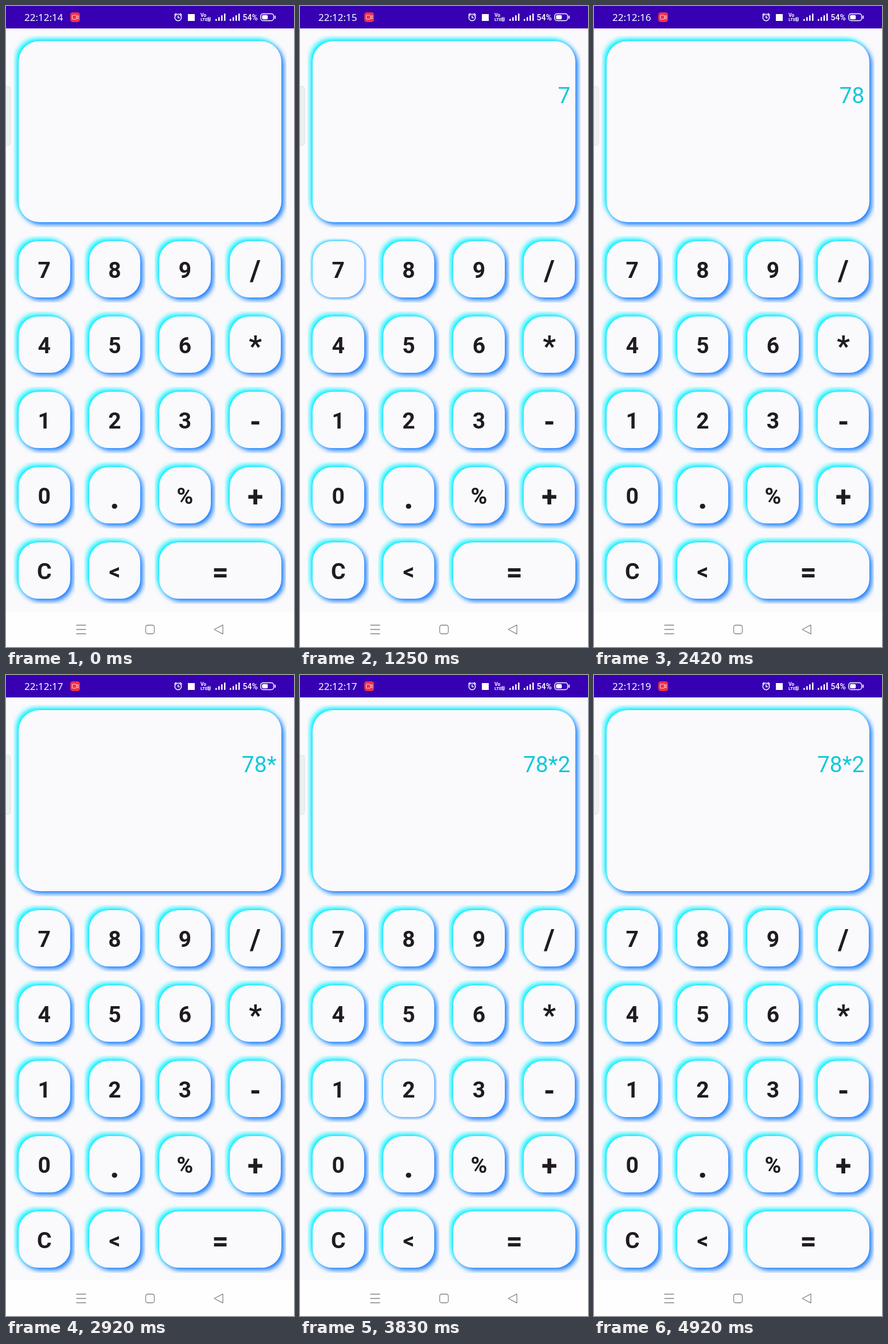
An HTML page for the animation above (5.01 s loop, 502x1115 px).

```html
<!DOCTYPE html>
<html lang="en">
<head>
<meta charset="utf-8">
<title>Calculator</title>
<style>
  html, body { margin: 0; width: 502px; height: 1115px; overflow: hidden; background: #faf9fc; }
  #stage { position: relative; width: 502px; height: 1115px; overflow: hidden; }
  svg { position: absolute; left: 0; top: 0; }
  text { font-family: Roboto, sans-serif; }
  /* The clip cuts the glow off at the bounds of each panel. */
  .clip { position: absolute; overflow: hidden; }
  .panel {
    position: absolute; inset: 8.6px; border-radius: 34px; background: #faf9fc;
    box-shadow: 4.3px 4.3px 8px #147aff, -4.3px -4.3px 8px #00f6ff;
  }
  .pressed { clip-path: inset(3.5px); }
  .pressed .panel { box-shadow: 1.8px 1.8px 5px #3c92ff, -1.8px -1.8px 5px #20d8ff; }
  .status text { fill: #fff; }
  #clock { font: 17px "Noto Sans", sans-serif; }
</style>
</head>
<body>
<div id="stage">
  <svg id="ink" width="502" height="1115" viewBox="0 0 502 1115" style="z-index:1">
    <g class="status">
      <rect width="502" height="39" fill="#3700b3"/>
      <text id="clock" x="32" y="26">22:12:14</text>
      <rect x="112" y="11" width="17" height="17" rx="4.5" fill="#ee2f48"/>
      <g fill="none" stroke="#ffd9de" stroke-width="1">
        <rect x="115.5" y="16" width="7.5" height="7" rx="1"/>
        <path d="M123 18.5l3-1.8v5.6l-3-1.8"/>
      </g>
      <g fill="none" stroke="#fff" stroke-width="1.5" stroke-linecap="round">
        <circle cx="300" cy="20" r="5.7"/>
        <path d="M300 17v3.4h2.6M293.7 15.8l2.8-2.7M306.3 15.8l-2.8-2.7"/>
      </g>
      <rect x="317" y="14" width="12" height="12" fill="#fff"/>
      <text x="339" y="18.5" font-size="8.5" font-weight="700">Vo</text>
      <text x="339" y="26" font-size="7.5" font-weight="700">LTE</text>
      <rect x="351.5" y="19.5" width="5" height="7" rx="1" fill="#fff"/>
      <text x="354" y="25.3" font-size="6.5" font-weight="700" text-anchor="middle" style="fill:#3700b3">2</text>
      <g id="bars" fill="#fff"></g>
      <text x="412.5" y="24.5" font-size="14" font-weight="500">54%</text>
      <rect x="444" y="13.5" width="22.5" height="12" rx="4" fill="none" stroke="#fff" stroke-width="1.5"/>
      <rect x="446.3" y="15.7" width="10" height="7.6" rx="2" fill="#fff"/>
      <path d="M469 17.5v4" stroke="#fff" stroke-width="1.8" stroke-linecap="round"/>
    </g>
    <rect x="-8" y="139.5" width="16" height="103" rx="5" fill="#eeeff1" stroke="#dfe1e3"/>
    <rect y="1053" width="502" height="62" fill="#fefefe"/>
    <g fill="none" stroke="#858585" stroke-width="1.3" stroke-linejoin="round">
      <path d="M122.5 1077h17M122.5 1084.5h17M122.5 1092h17"/>
      <rect x="243.5" y="1077" width="15" height="15" rx="3.5"/>
      <path d="M363 1084.5L378 1076.7V1092.3Z"/>
    </g>
    <text id="entry" x="471.5" y="169" font-size="39" fill="#12c8d8" text-anchor="end"></text>
  </svg>
</div>
<script>
const LOOP = 5010, PAD = 8.6;
const stage = document.getElementById('stage');
const ink = document.getElementById('ink');
const clock = document.getElementById('clock');
const entry = document.getElementById('entry');
const keys = {};

function panel(x, y, w, h, radius) {
  const clip = document.createElement('div');
  clip.className = 'clip';
  clip.style.cssText =
    `left:${x - PAD}px;top:${y - PAD}px;width:${w + 2 * PAD}px;height:${h + 2 * PAD}px`;
  const face = document.createElement('div');
  face.className = 'panel';
  face.style.borderRadius = radius + 'px';
  clip.append(face);
  stage.append(clip);
  return clip;
}

function svg(tag, attrs, parent) {
  const el = document.createElementNS('http://www.w3.org/2000/svg', tag);
  for (const name in attrs) el.setAttribute(name, attrs[name]);
  parent.append(el);
  return el;
}

function addKey(label, col, row) {
  const x = 22 + col * 122.6, y = 409 + row * 131;
  const w = label === '=' ? 212.5 : 89.6, h = 98;
  const size = label === '.' ? 58 : '/*-+='.includes(label) ? 50 : 39;
  keys[label] = panel(x, y, w, h, 34);
  svg('text', {
    x: x + w / 2, y: y + h / 2 + size * 0.392,
    'font-size': size, 'font-weight': 700, 'text-anchor': 'middle', fill: '#1f1b20'
  }, ink).textContent = label;
}

panel(22, 61, 458, 315.5, 36);
['789/', '456*', '123-', '0.%+', 'C<='].forEach((line, row) =>
  [...line].forEach((label, col) => addKey(label, col, row)));

for (const x of [365, 390])
  for (let i = 0; i < 4; i++) {
    const h = 3.5 + i * 3.2;
    svg('rect', { x: x + i * 5, y: 26 - h, width: 2.5, height: h, rx: 1 },
      document.getElementById('bars'));
  }

const ticks = [920, 1920, 2920, 3920, 4920];
const taps = [[1170, '7'], [1580, '8'], [2580, '*'], [3750, '2']];

function setText(el, text) {
  if (el.textContent !== text) el.textContent = text;
}

function draw(t) {
  setText(clock, '22:12:' + (14 + ticks.filter(at => t >= at).length));
  setText(entry, taps.filter(([at]) => t >= at).map(tap => tap[1]).join(''));
  for (const [at, label] of taps)
    keys[label].classList.toggle('pressed', t >= at + 80 && t < at + 165);
}

const start = performance.now();
function frame() {
  draw((performance.now() - start) % LOOP);
  requestAnimationFrame(frame);
}
frame();
</script>
</body>
</html>
```
